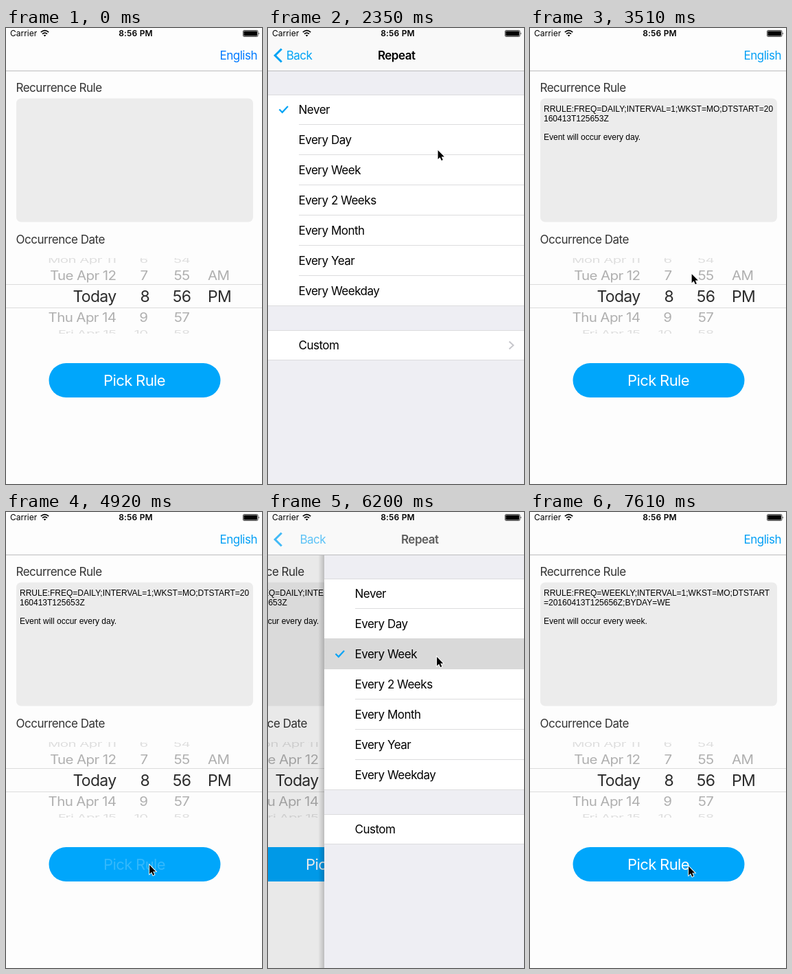
Write an HTML page that moves like this. It is 373 px wide and 664 px high and loops after 8000 ms.

```html
<!DOCTYPE html>
<html lang="en">
<head>
<meta charset="utf-8">
<title>Recurrence picker</title>
<style>
  html, body { margin: 0; width: 100%; height: 100%; overflow: hidden; background: #fdfdfd; }
  svg { display: block; width: 100%; height: 100%; }
  text { font: 17px Inter, Roboto, sans-serif; letter-spacing: -.029em; white-space: pre; }
  .status { font-size: 12px; letter-spacing: 0; }
  .clock { font-size: 12px; font-weight: 600; letter-spacing: .015em; }
  .title { font-weight: 600; }
  .rule { font: 12px "Liberation Sans", Arial, sans-serif; letter-spacing: 0; }
  .button { font-size: 22px; }
  .main { font-size: 23px; }
  .side { font-size: 20.5px; }
</style>
</head>
<body>
<svg id="stage" viewBox="0 0 373 664" preserveAspectRatio="none">
  <defs>
    <linearGradient id="edge">
      <stop offset="0" stop-color="#000" stop-opacity="0"/>
      <stop offset="1" stop-color="#000" stop-opacity=".22"/>
    </linearGradient>
    <clipPath id="wheel"><rect y="335" width="373" height="110"/></clipPath>
  </defs>
  <rect width="373" height="664" fill="#fdfdfd"/>

  <g id="home">
    <text x="14.5" y="93" fill="#333">Recurrence Rule</text>
    <rect x="15" y="102.5" width="345" height="180" rx="7" fill="#ececec"/>
    <g id="rule"></g>
    <text x="14.5" y="313.5" fill="#333">Occurrence Date</text>
    <g id="picker" clip-path="url(#wheel)"></g>
    <path d="M0 373.5H373M0 407.5H373" stroke="#dcdcdc"/>
    <rect x="62.5" y="488" width="250" height="50" rx="25" fill="#00a6fb"/>
    <text id="pick" class="button" x="187" y="521" text-anchor="middle" fill="#fff">Pick Rule</text>
  </g>
  <rect id="dim" y="63" width="373" height="601"/>

  <g id="page">
    <rect id="shadow" x="-9" y="63" width="9" height="601" fill="url(#edge)"/>
    <rect y="62" width="373" height="602" fill="#eeeef3"/>
    <rect y="97" width="373" height="308" fill="#fff"/>
    <rect y="440" width="373" height="44" fill="#fff"/>
    <g id="rows"></g>
    <rect id="mark" width="373" height="45" fill="#d9d9d9"/>
    <g id="labels"></g>
    <path d="M0 97.5H373M0 404.5H373M0 440.5H373M0 483.5H373" stroke="#dcdcde"/>
    <path id="check" d="M16.5 118.5L20.8 122.8L29 114" fill="none" stroke="#00a3f5" stroke-width="2.2"/>
    <path d="M351.5 456.5L357.5 462L351.5 467.5" fill="none" stroke="#c7c7cc" stroke-width="2"/>
  </g>

  <rect width="373" height="62" fill="#fdfdfd"/>
  <rect id="bar" width="373" height="62" fill="#f9f9f9"/>
  <path d="M0 62.5H373" stroke="#bcbcbe"/>
  <text id="lang" x="366" y="46" text-anchor="end">English</text>
  <path id="arrow" d="M19.8 30.5L10.2 40L19.8 49.5" fill="none" stroke="#00a3f5" stroke-width="3"/>
  <text id="back" y="46" fill="#00a3f5">Back</text>
  <text id="title" class="title" y="46" text-anchor="middle">Repeat</text>

  <text class="status" x="6" y="12.3">Carrier</text>
  <g fill="none" stroke="#000" stroke-width="1.7">
    <path d="M50.8 6.2Q56.5 1.2 62.2 6.2M53 8.6Q56.5 5.5 60 8.6"/>
    <path d="M56.5 12.4L54.7 10.4Q56.5 8.9 58.3 10.4Z" fill="#000" stroke="none"/>
  </g>
  <text class="clock" x="189" y="12.4" text-anchor="middle">8:56 PM</text>
  <rect x="345.5" y="3.5" width="21.5" height="9" rx="1.4" fill="none" stroke="#000" stroke-width=".7"/>
  <rect x="346.4" y="4.5" width="19.6" height="7" rx=".7"/>
  <path d="M368 6.2Q369.7 8 368 9.8Z"/>

  <g id="cursor">
    <path d="M.6 1V14L3.6 11.2L5.8 16L7.8 15.1L5.7 10.4H9.8Z"
          stroke="#fff" stroke-width="1.8" paint-order="stroke"/>
  </g>
</svg>
<script>
const LOOP = 8000, WIDTH = 373, STEP = 87.5;
const $ = id => document.getElementById(id);
const clamp = v => Math.max(0, Math.min(1, v));
const set = (id, attrs) => {
  for (const key in attrs) $(id).setAttribute(key, attrs[key]);
};
const move = (id, x, y = 0) => set(id, { transform: `translate(${x} ${y})` });

function add(parent, tag, attrs, content = '') {
  const el = document.createElementNS('http://www.w3.org/2000/svg', tag);
  for (const key in attrs) el.setAttribute(key, attrs[key]);
  el.textContent = content;
  $(parent).append(el);
  return el;
}

// Date wheel: each row is [baseline, class, vertical squash, colour, cells]
const wheel = [
  [342, 'side', .55, '#dedede', ['Mon Apr 11', '6', '54', '']],
  [367, 'side', .88, '#afafaf', ['Tue Apr 12', '7', '55', 'AM']],
  [399, 'main', 1, '#2c2c2c', ['Today', '8', '56', 'PM']],
  [427.5, 'side', .88, '#afafaf', ['Thu Apr 14', '9', '57', '']],
  [449, 'side', .55, '#dedede', ['Fri Apr 15', '10', '58', '']]
];
for (const [y, cls, squash, fill, cells] of wheel) {
  const main = cls === 'main';
  const columns = [[160.5, 'end'], [main ? 209 : 206.5, 'end'], [256, 'middle'], [294, 'start']];
  cells.forEach((cell, i) => add('picker', 'text', {
    class: cls, fill, 'text-anchor': columns[i][1],
    transform: `translate(${columns[i][0]} ${y}) scale(1 ${squash})`
  }, cell));
}

// Repeat list
const options = ['Never', 'Every Day', 'Every Week', 'Every 2 Weeks',
  'Every Month', 'Every Year', 'Every Weekday'];
options.forEach((name, i) => {
  if (i) add('rows', 'rect', { x: 45, y: 96 + 44 * i, width: 328, height: 1, fill: '#dcdcde' });
  add('labels', 'text', { x: 44.5, y: 124.6 + 44 * i }, name);
});
add('labels', 'text', { x: 44.5, y: 467.6 }, 'Custom');

// Rule text
const lines = [122.3, 136, 163.4].map(y => add('rule', 'text', { class: 'rule', x: 20, y }));
const rules = [
  ['', '', ''],
  ['RRULE:FREQ=DAILY;INTERVAL=1;WKST=MO;DTSTART=20', '160413T125653Z',
    'Event will occur every day.'],
  ['RRULE:FREQ=WEEKLY;INTERVAL=1;WKST=MO;DTSTART', '=20160413T125656Z;BYDAY=WE',
    'Event will occur every week.']
];

// Screen changes: start time, direction, checked row
const slides = [
  { at: 1175, push: true, row: 0 },
  { at: 2662, push: false, row: 1 },
  { at: 5055, push: true, row: 1 },
  { at: 6165.6, push: false, row: 2 }
];

// Pointer path: time, x, y
const path = [
  [500, 304, 495], [940, 253, 508], [1650, 253, 508], [2350, 247, 177],
  [2520, 247, 172], [2870, 247, 172], [3510, 235, 358], [3690, 234, 388],
  [4390, 208.5, 513], [5240, 208.5, 513], [5840, 243, 210], [5930, 245.5, 210],
  [6460, 245.5, 210], [6990, 239, 377], [7600, 230.5, 515]
];

function pointer(t) {
  const next = path.findIndex(k => k[0] > t);
  if (next < 0) return path[path.length - 1].slice(1);
  const a = path[Math.max(0, next - 1)], b = path[next];
  const u = clamp((t - a[0]) / (b[0] - a[0] || 1));
  const e = u * u * (3 - 2 * u);
  return [a[1] + (b[1] - a[1]) * e, a[2] + (b[2] - a[2]) * e];
}

// The picture refreshes in even steps that restart at each action
function snap(t) {
  const from = [0, 500, 1210, 4740, 5090, 6200].filter(a => a <= t).pop();
  return from + Math.floor((t - from) / STEP + 1e-6) * STEP;
}

function draw(time) {
  const t = snap(time);
  const slide = slides.filter(s => s.at <= t).pop() || { at: -1e4, push: false, row: 0 };
  const { push, row } = slide;
  let left = Math.exp(-.0072 * (t - slide.at));
  if (left < .004) left = 0;
  const r = push ? left : 1 - left;   // 0: list covers the stage, 1: home
  const x = Math.round(WIDTH * r);

  move('home', Math.round(-.3 * (WIDTH - x)));
  set('dim', { opacity: .1 * (1 - r) });
  move('page', x);
  set('page', { visibility: r < 1 ? 'visible' : 'hidden' });
  set('shadow', { opacity: clamp(r * 4) });
  set('mark', { y: 96 + 44 * row, visibility: push || r === 1 ? 'hidden' : 'inherit' });
  move('check', 0, 44 * row);

  set('bar', { opacity: 1 - r });
  set('lang', {
    fill: t < 1210 ? '#007aff' : '#05a0f5',
    opacity: push ? r : clamp((r - .3) / .7)
  });
  const fade = push ? 1 - r : clamp(1 - 1.7 * r);
  set('arrow', { opacity: push ? clamp(1 - 9 * r) : clamp(1 - 1.2 * r) });
  set('back', { x: 26.7 + x * (push ? .3 : .24), opacity: fade });
  set('title', { x: 187.2 + x * (push ? .52 : .415), opacity: fade });

  const rule = rules[t < 3200 ? 0 : t < 6705 ? 1 : 2];
  lines.forEach((line, i) => { line.textContent = rule[i]; });

  const press = clamp((t - 4650) / 260) * (1 - clamp((t - 5060) / 260));
  set('pick', { opacity: 1 - .8 * press });

  set('cursor', { visibility: t < 500 ? 'hidden' : 'visible' });
  move('cursor', ...pointer(t));
}

const start = performance.now();
function tick() {
  draw((performance.now() - start) % LOOP);
  requestAnimationFrame(tick);
}
tick();
</script>
</body>
</html>
```
